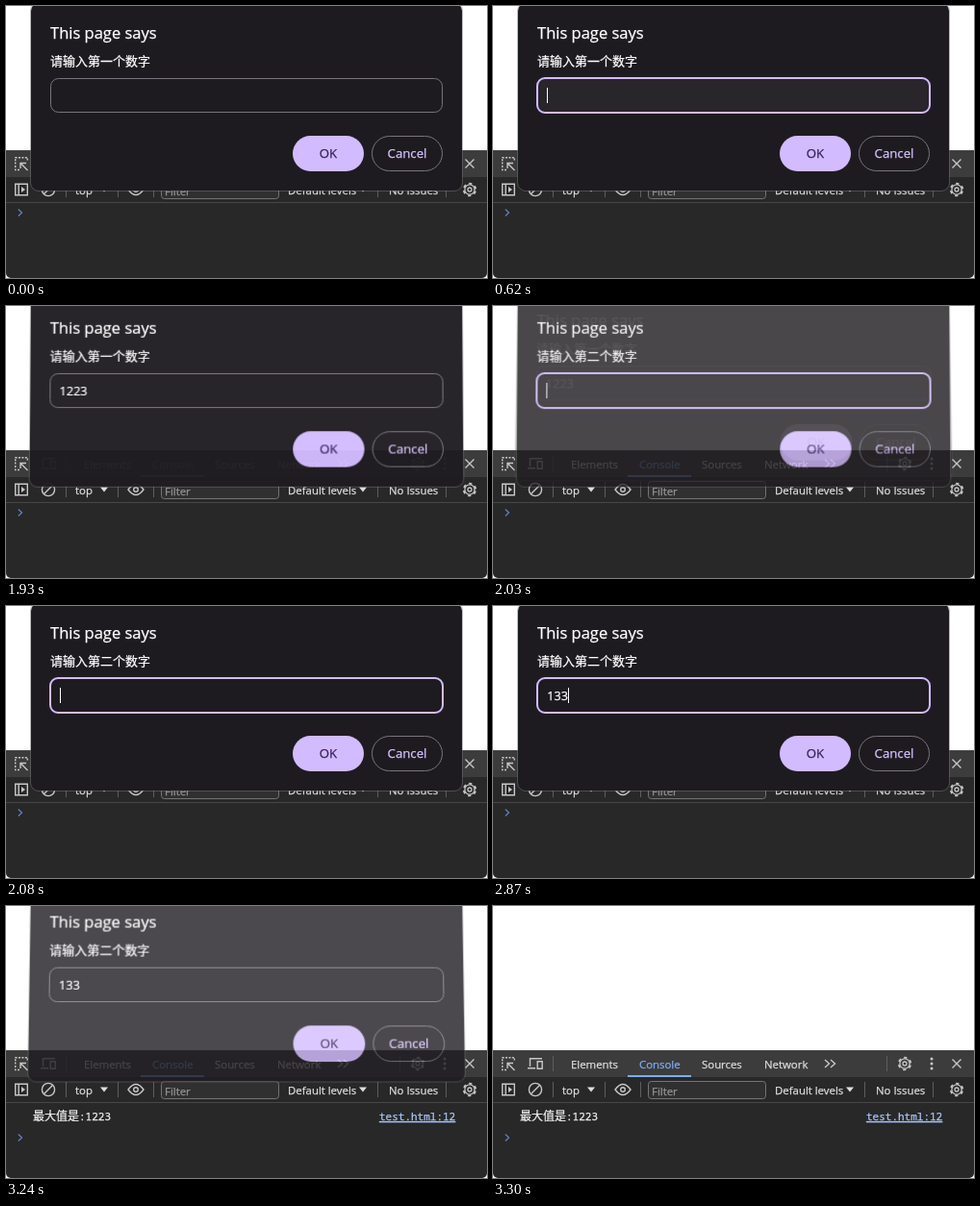
An HTML page that plays this animation: 500x283 px, repeating every 4.96 s.

```html
<!DOCTYPE html>
<html lang="zh">
<head>
<meta charset="utf-8">
<style>
  html, body { margin: 0; width: 100%; height: 100%; overflow: hidden; background: #fff; }
  #stage { position: relative; width: 100%; height: 100%; overflow: clip; contain: strict; }
  svg { position: absolute; left: 0; top: 0; width: 500px; height: 283px; transform-origin: 250px 0; }
  text {
    font-family: "Open Sans", "Noto Sans CJK SC", sans-serif; white-space: pre;
    fill: currentColor; stroke: currentColor; stroke-width: .25;
  }
  .ui text { font-size: 11.4px; color: #dedede; }
  .ui .mono { font: 11px "Noto Sans Mono", "Noto Sans CJK SC", monospace; color: #f0f0f0; }
  .ui .link { color: #a8c7fa; text-decoration: underline; }
  .cjk { font-size: 12px; }
  .line { fill: none; stroke: #c7c7c7; stroke-width: 1.4; }
  .rule { stroke: #5e5e5e; }
  .dialog text { font-size: 13.2px; color: #fff; }
  .dialog .title { font-size: 16.5px; }
  .dialog .ask { font: 13px "Noto Sans CJK SC", sans-serif; }
  .dialog .value { font-size: 12.6px; }
</style>
</head>
<body>
<div id="stage">
<svg class="ui">
  <defs>
    <g id="gear">
      <circle class="line" r="6.3" style="stroke-width:1.8" stroke-dasharray="3.2 3.4" stroke-dashoffset="-1.7"/>
      <circle class="line" r="5.1" style="stroke-width:1.3"/>
      <circle class="line" r="2" style="stroke-width:1.3"/>
    </g>
    <path id="down" d="M-4-2.5h8l-4 5z" fill="#dedede"/>
  </defs>
  <path d="M0 150H500V278a5 5 0 0 1-5 5H5a5 5 0 0 1-5-5z" fill="#282828"/>
  <path d="M0 150H500V178H0z" fill="#3c3c3c"/>
  <path d="M0 150.5H500M0 204.5H500" stroke="#474747"/>
  <path class="rule" d="M62.5 156v16M409.5 156v16M62.5 183v16M116.5 183v16M153.5 183v16M386.5 183v16M457.5 183v16"/>

  <path class="line" stroke-dasharray="2 1.4" d="M14 170.5H9.7V157.7H22.3V162"/>
  <path class="line" d="M22.5 171l-7-7M15 169v-5.5h6"/>
  <path class="line" d="M38.5 167v-8.3H51M36 168.8h8M46.2 161.7h5v7.6h-5z"/>
  <text x="81" y="169">Elements</text>
  <text x="152" y="169" style="color:#7cacf8">Console</text>
  <text x="217" y="169">Sources</text>
  <text x="282" y="169">Network</text>
  <path d="M140 176H206V178H140z" fill="#7cacf8"/>
  <path class="line" d="M345 160l4.5 4-4.5 4M351 160l4.5 4-4.5 4"/>
  <use href="#gear" x="428" y="164"/>
  <g fill="#c7c7c7"><circle cx="456" cy="159" r="1.5"/><circle cx="456" cy="164" r="1.5"/><circle cx="456" cy="169" r="1.5"/></g>
  <path class="line" d="M477.5 159.5l9 9M486.5 159.5l-9 9"/>

  <path class="line" d="M9.7 185.2H22.3V196.8H9.7zM13.2 185v12"/>
  <path d="M16 188l4 3-4 3z" fill="#c7c7c7"/>
  <circle class="line" cx="44" cy="191" r="6.6"/>
  <path class="line" d="M48.7 186.3l-9.4 9.4"/>
  <text x="72" y="196">top</text>
  <use href="#down" x="102" y="191"/>
  <path class="line" d="M127 191q8-11 16 0q-8 11-16 0z"/>
  <circle class="line" cx="135" cy="191" r="2.3"/>
  <rect x="161.5" y="182.5" width="122" height="18" rx="3" fill="#303030" stroke="#757575"/>
  <text x="165" y="197" style="color:#969696">Filter</text>
  <text x="293" y="196">Default levels</text>
  <use href="#down" x="371" y="191"/>
  <text x="398" y="196">No Issues</text>
  <use href="#gear" x="482" y="191"/>

  <g id="log">
    <text class="mono" x="28" y="223"><tspan class="cjk">最大值是</tspan>:1223</text>
    <text class="mono link" x="388" y="223">test.html:12</text>
  </g>
  <path id="prompt" d="M12.8 211.5l3.7 3.5-3.7 3.5" fill="none" stroke="#5f84c0" stroke-width="1.2"/>
</svg>
<svg id="pointer"><path d="M.5.5v15l3.5-3.3 2.6 5.6 2.4-1.1-2.5-5.4h4.8z" fill="#fff" stroke="#000"/></svg>
</div>
<script>
const LOOP = 4960;
const stage = document.getElementById("stage");
const pointer = document.getElementById("pointer");
const log = document.getElementById("log");
const prompt = document.getElementById("prompt");

function makeDialog(question) {
  const svg = document.createElementNS("http://www.w3.org/2000/svg", "svg");
  svg.setAttribute("class", "dialog");
  svg.innerHTML = `
    <rect x="26" y="-3" width="448" height="195" rx="8" fill="#1e1b20"/>
    <rect x="25.5" y="-3.5" width="449" height="196" rx="8.5" fill="none" stroke="#757575" stroke-opacity=".5"/>
    <text class="title" x="46" y="34">This page says</text>
    <text class="ask" x="46" y="62">${question}</text>
    <rect class="field" rx="8"/>
    <text class="value" x="56.3" y="98"></text>
    <path class="caret" stroke="#fff"/>
    <rect x="298" y="135" width="74" height="37" rx="18.5" fill="#d3bbff"/>
    <text x="335" y="158" text-anchor="middle" style="color:#38225f">OK</text>
    <rect x="380.5" y="135.5" width="73" height="36" rx="18" fill="none" stroke="#79747e"/>
    <text x="417" y="158" text-anchor="middle" style="color:#d8c3ff">Cancel</text>`;
  stage.insertBefore(svg, pointer);
  return svg;
}

const first = makeDialog("请输入第一个数字");
const second = makeDialog("请输入第二个数字");

// Last entry of [time, value] pairs already reached.
const latest = (t, steps) => steps.filter(([at]) => at <= t).pop()[1];

function setAttrs(node, attrs) {
  for (const name in attrs) node.setAttribute(name, attrs[name]);
}

function drawField(svg, value, focused, caret, hover) {
  const inset = focused ? 0 : 0.5;
  setAttrs(svg.querySelector(".field"), {
    x: 46 + inset, y: 75 + inset, width: 408 - 2 * inset, height: 36 - 2 * inset,
    fill: hover ? "#28252b" : "#1e1b20",
    stroke: focused ? "#d3bbff" : "#79747e",
    "stroke-width": focused ? 2 : 1
  });
  svg.querySelector(".value").textContent = value;
  setAttrs(svg.querySelector(".caret"), {
    d: `M${Math.round(56 + value.length * 7.2) + 0.5} 85v16`,
    opacity: caret ? 1 : 0
  });
}

// The window tilts, rises and fades as it opens or closes.
function pose(svg, [opacity, lift]) {
  svg.style.opacity = opacity;
  svg.style.transform = lift
    ? `perspective(1000px) translateY(${-13 * lift}px) rotateX(${4.5 * lift}deg)` : "none";
}

const closing = start => [
  [start, [0.96, 0.4]], [start + 50, [0.8, 0.88]], [start + 100, [0.25, 1]], [start + 150, [0, 1]]
];

function render(t) {
  pose(first, latest(t, [[0, [1, 0]], ...closing(1930)]));
  drawField(first, latest(t, [[0, ""], [1380, "12"], [1560, "1223"]]),
    t >= 620 && t < 1930,
    t >= 620 && t < 1930 && !(t >= 1050 && t < 1380),
    t >= 580 && t < 1380);

  pose(second, latest(t, [[0, [0, 1]], [2030, [0.75, 0.4]], [2080, [1, 0]], ...closing(3150)]));
  drawField(second, latest(t, [[0, ""], [2460, "1"], [2580, "13"], [2870, "133"]]),
    t < 3150, t < 3150, false);

  const done = t >= 3150;
  log.style.display = done ? "" : "none";
  prompt.setAttribute("transform", `translate(0 ${done ? 26 : 0})`);

  const step = Math.min(6, Math.floor((t - 130) / 51.6)) / 6;
  pointer.style.display = t >= 130 && t < 580 ? "" : "none";
  pointer.style.transform = `translate(${106 - 36 * step}px, ${258 - 177 * step}px)`;
}

function tick(now) {
  render(now % LOOP);
  requestAnimationFrame(tick);
}
render(0);
requestAnimationFrame(tick);
</script>
</body>
</html>
```
